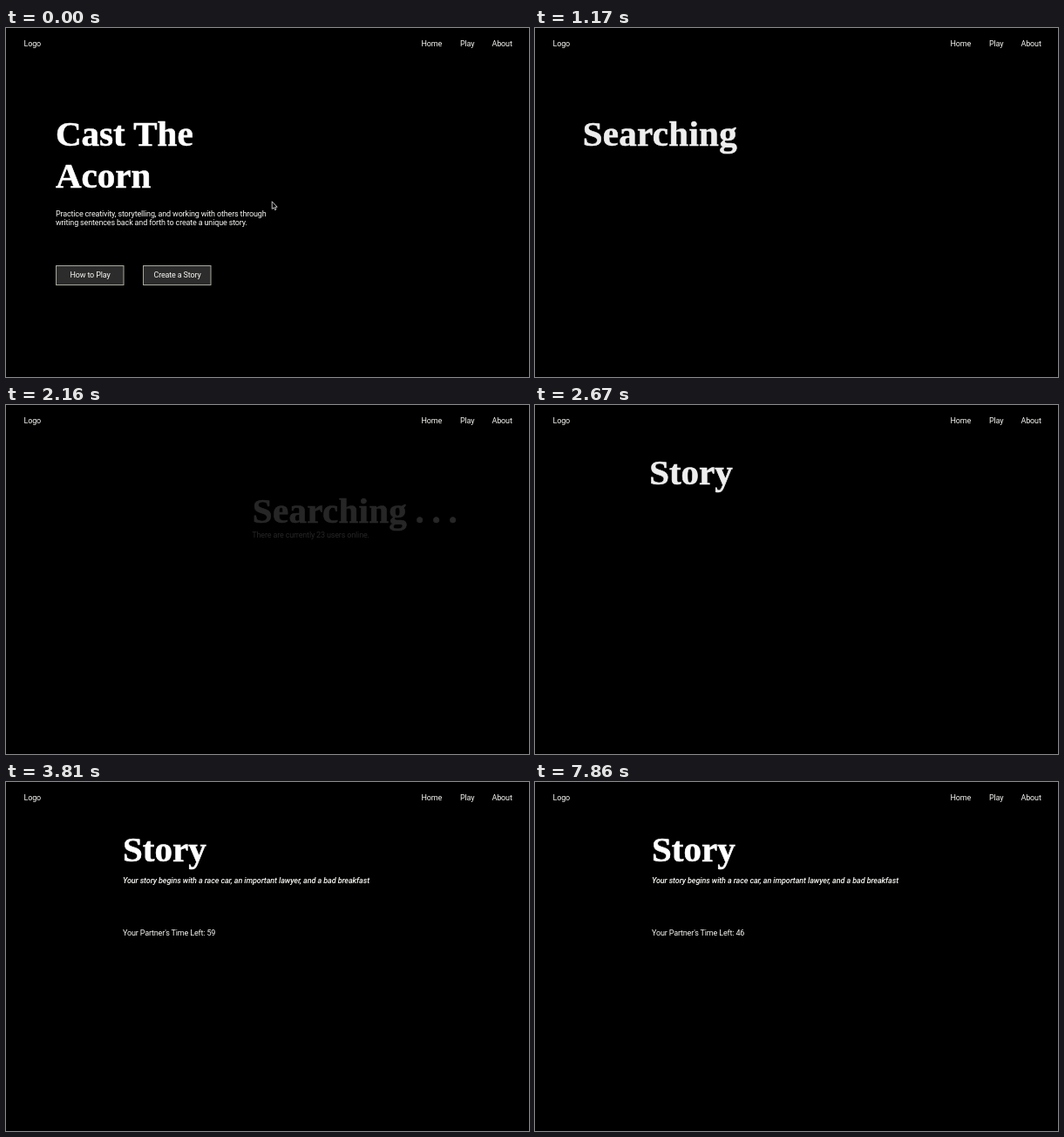
Animation, 600 px wide and 400 px high, one loop 8 s. Source, as an HTML page:

```html
<!DOCTYPE html>
<html lang="en">
<head>
<meta charset="utf-8">
<title>Story game</title>
<style>
  html, body { margin: 0; width: 100%; height: 100%; overflow: hidden; background: #000; }
  svg { display: block; width: 100%; height: 100%; }
  text { font: 9px Roboto, "Liberation Sans", sans-serif; letter-spacing: -.16px; fill: #f8f8f4; white-space: pre; }
  .title { font: bold 41px "Liberation Serif", "Noto Serif", serif; letter-spacing: 0; fill: #fff; stroke: #fff; stroke-width: .6; }
  .title tspan { letter-spacing: -.8px; }
  .prompt { font-style: italic; font-weight: 500; letter-spacing: -.09px; }
  .mid { text-anchor: middle; }
  .button rect { fill: #2c2c2c; stroke: #a8a89c; }
</style>
</head>
<body>
<svg viewBox="0 0 600 400">
  <rect width="600" height="400" fill="#000"/>
  <text x="20.5" y="21">Logo</text>
  <text x="476.5" y="21">Home</text>
  <text x="521" y="21">Play</text>
  <text x="557.5" y="21">About</text>

  <g id="home">
    <text class="title" x="57" y="135">Cast The</text>
    <text class="title" x="57" y="182.5">Acorn</text>
    <text x="57" y="216">Practice creativity, storytelling, and working with others through</text>
    <text x="57" y="226">writing sentences back and forth to create a unique story.</text>
    <g class="button">
      <rect x="57.5" y="272.5" width="77.5" height="22"/>
      <text class="mid" x="96.5" y="286">How to Play</text>
    </g>
    <g class="button">
      <rect id="create" x="157.5" y="272.5" width="77.5" height="22"/>
      <text class="mid" x="196.5" y="286">Create a Story</text>
    </g>
    <path id="cursor" d="M0 0V8.6L2 7L3.4 9.8L4.7 9.2L3.5 6.4H6Z" fill="#000" stroke="#f4f4f4" stroke-width=".8"/>
  </g>

  <g id="search">
    <text id="searchTitle" class="title" x="57.5" y="135.2" style="letter-spacing:.3px">Searching<tspan id="dot0"> .</tspan><tspan id="dot1"> .</tspan><tspan id="dot2"> .</tspan></text>
    <text id="online" x="57" y="152">There are currently 23 users online.</text>
  </g>

  <text id="story" class="title" x="134" y="91.2">Story</text>
  <text id="prompt" class="prompt" x="134" y="115.8">Your story begins with a race car, an important lawyer, and a bad breakfast</text>
  <text id="timer" x="134" y="175.8"></text>
</svg>
<script>
  const LOOP = 8000;
  const el = id => document.getElementById(id);
  const progress = (t, start, length) => Math.min(1, Math.max(0, (t - start) / length));
  const easeOut = p => 1 - (1 - p) ** 2;
  const easeInOut = p => p * p * (3 - 2 * p);
  const mix = (a, b, p) => a + (b - a) * p;

  function place(id, x, y, opacity) {
    el(id).setAttribute("transform", `translate(${x} ${y})`);
    el(id).setAttribute("opacity", opacity);
  }

  // Fade in while sliding from the left.
  function enter(id, t, start, length, distance) {
    const p = easeOut(progress(t, start, length));
    place(id, (p - 1) * distance, 0, p);
  }

  function draw(t) {
    const move = easeInOut(progress(t, 15, 375));
    const shade = mix(44, 84, progress(t, 240, 150));
    place("cursor", mix(305.2, 207, move), mix(198.8, 282, move), 1);
    el("create").style.fill = `rgb(${shade},${shade},${shade})`;
    el("home").setAttribute("opacity", 1 - progress(t, 540, 240));

    enter("searchTitle", t, 750, 570, 42);
    for (let i = 0; i < 3; i++) {
      const dot = progress(t, 1340 + i * 105, 90);
      el("dot" + i).setAttribute("fill-opacity", dot);
      el("dot" + i).setAttribute("stroke-opacity", dot);
    }
    enter("online", t, 1335, 340, 32);
    const leave = progress(t, 1820, 400);
    place("search", 310 * leave * leave, 0, 1 - leave);

    enter("story", t, 2250, 570, 42);
    enter("prompt", t, 2850, 420, 21);
    enter("timer", t, 3240, 420, 21);
    const left = t < 3810 ? 60 : 59 - Math.floor((t - 3810) / 300);
    el("timer").textContent = "Your Partner's Time Left: " + left;
  }

  const begin = performance.now();
  function tick() {
    draw((performance.now() - begin) % LOOP);
    requestAnimationFrame(tick);
  }
  draw(0);
  requestAnimationFrame(tick);
</script>
</body>
</html>
```
